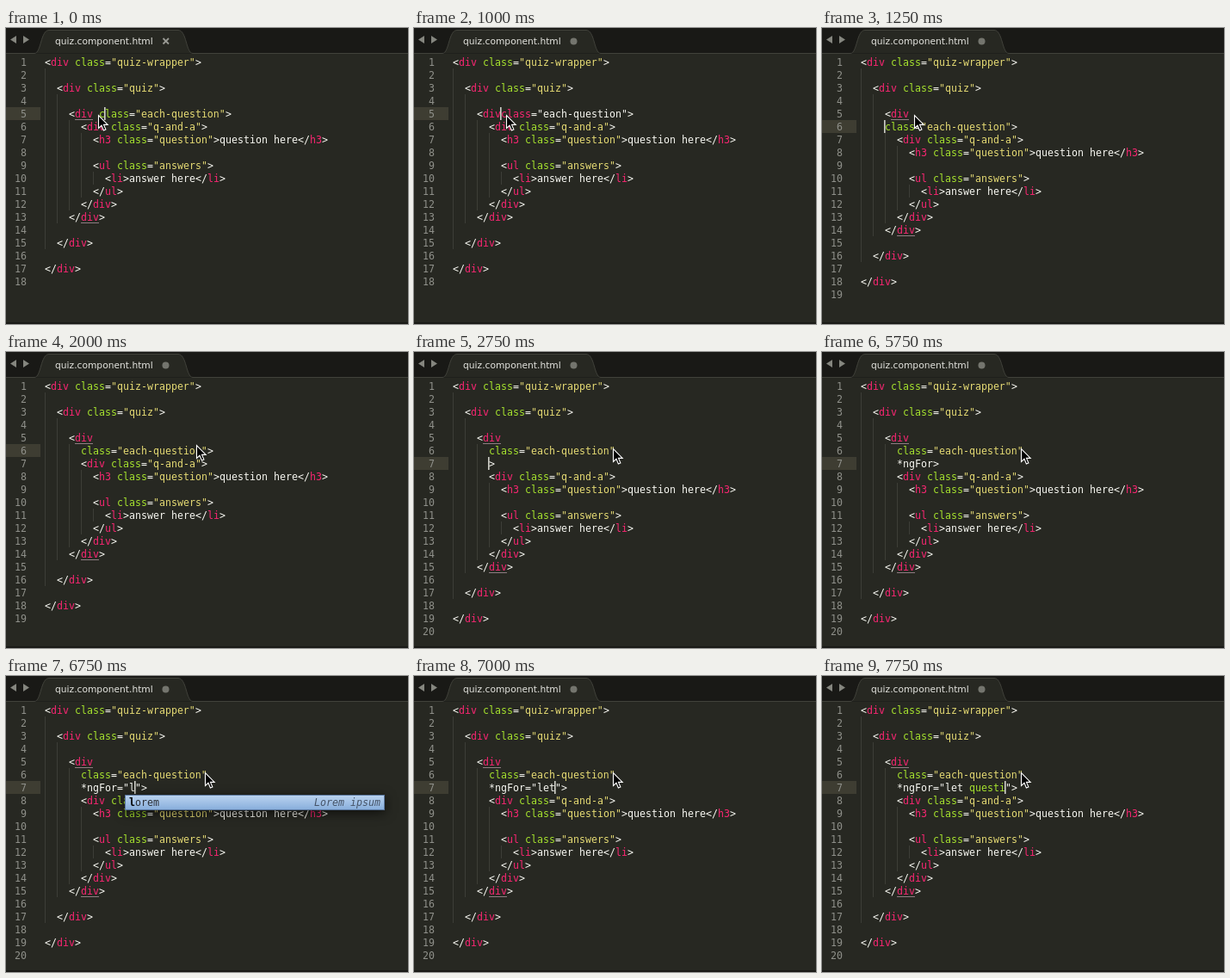
Recreate the animation shown at these times as an HTML page with a canvas. Size 467 by 344 pixels, loop 8 s.

```html
<!DOCTYPE html>
<html lang="en">
<head>
<meta charset="utf-8">
<title>Code editor</title>
<style>
  html, body { margin: 0; width: 100%; height: 100%; overflow: hidden; background: #272822; }
  canvas { display: block; }
</style>
</head>
<body>
<canvas width="467" height="344"></canvas>
<script>
const ctx = document.querySelector('canvas').getContext('2d');
const LOOP = 8000, LEFT = 45, CHAR = 7, LINE = 15;
const MONO = '11.627px "DejaVu Sans Mono", monospace';
const COLORS = { plain: '#f8f8f2', tag: '#f92672', attr: '#a6e22e', string: '#e6db74' };
const TOKEN = /(?<tag>(?<=<\/?)\w+)|(?<attr>(?<=\s)class|(?<=let )\w+)|(?<string>(?<=\sclass=)".*?")|(?<plain>.)/g;

const BEFORE = ['<div class="quiz-wrapper">', '', '  <div class="quiz">', ''];
const AFTER = [
  '      <div class="q-and-a">',
  '        <h3 class="question">question here</h3>',
  '',
  '        <ul class="answers">',
  '          <li>answer here</li>',
  '        </ul>',
  '      </div>',
  '    </div>',
  '',
  '  </div>',
  '',
  '</div>',
  ''
];

const ONE_LINE = '    <div class="each-question">';
const JOINED = '    <divclass="each-question">';
const SPLIT = '    <div\n      class="each-question">';
const typed = text => `    <div\n      class="each-question"\n      ${text}>`;

// [start ms, opening tag, caret line, caret column (null while hidden)]
const STEPS = [
  [0, ONE_LINE, 5, 10],
  [250, ONE_LINE, 5, null],
  [500, ONE_LINE, 5, 10],
  [750, ONE_LINE, 5, 9],
  [1000, JOINED, 5, 8],
  [1250, '    <div\n    class="each-question">', 6, 4],
  [1500, SPLIT, 6, 6],
  [2000, SPLIT, 6, null],
  [2250, SPLIT, 6, 6],
  [2500, SPLIT, 6, 27],
  [2750, typed(''), 7, 6],
  [3250, typed(''), 7, null],
  [3750, typed('*'), 7, 7],
  [4000, typed('*'), 7, null],
  [4250, typed('*'), 7, 7],
  [4500, typed('*n'), 7, 8],
  [4750, typed('*ng'), 7, 9],
  [5000, typed('*ngF'), 7, 10],
  [5250, typed('*ngFor'), 7, 12],
  [5750, typed('*ngFor'), 7, null],
  [6000, typed('*ngFor'), 7, 12],
  [6250, typed('*ngFor='), 7, 13],
  [6500, typed('*ngFor=""'), 7, 14],
  [6750, typed('*ngFor="l"'), 7, 15],
  [7000, typed('*ngFor="let"'), 7, 17],
  [7250, typed('*ngFor="let q"'), 7, 19],
  [7500, typed('*ngFor="let ques"'), 7, 22],
  [7750, typed('*ngFor="let questi"'), 7, 24]
];

// [start ms, x, y]
const POINTER = [[0, 107, 101], [1750, 162, 105], [2000, 221, 108], [2250, 231, 112]];

const TAB = new Path2D('M-2 29.5H33C41 29.5 40 2.5 50 2.5H200C210 2.5 209 29.5 217 29.5H469');
const ARROWS = new Path2D('M12 9V18L5 13.5ZM20 9V18L27 13.5Z');
const CROSS = new Path2D('M182.5 12L189 18.5M189 12L182.5 18.5');
const ARROW_POINTER = new Path2D('M.5 .5V15.5L4 12.3L6.4 18L8.9 17L6.5 11.4H11.2Z');

const rowTop = line => 32 + (line - 1) * LINE;
const colX = col => LEFT + col * CHAR;
const current = (list, time) => list.findLast(item => item[0] <= time);
const indentOf = line => line.search(/\S/);

function rect(color, x, y, w, h) {
  ctx.fillStyle = color;
  ctx.fillRect(x, y, w, h);
}

function text(string, x, y, color, font = MONO, align = 'left') {
  ctx.font = font;
  ctx.fillStyle = color;
  ctx.textAlign = align;
  ctx.fillText(string, x, y);
}

function stroke(path, color, width) {
  ctx.strokeStyle = color;
  ctx.lineWidth = width;
  ctx.stroke(path);
}

function drawTabBar(dirty) {
  rect('#191916', 0, 0, 467, 30);
  ctx.fillStyle = '#272822';
  ctx.fill(TAB);
  stroke(TAB, '#41423b', 1);
  ctx.fillStyle = '#85867f';
  ctx.fill(ARROWS);
  text('quiz.component.html', 57, 19, '#e4e4df', '10.7px "DejaVu Sans", sans-serif');
  if (dirty) {
    ctx.fillStyle = '#74756e';
    ctx.beginPath();
    ctx.arc(185.5, 15.5, 4, 0, 7);
    ctx.fill();
  } else {
    stroke(CROSS, '#999a94', 1.8);
  }
}

function drawLine(line, index, lines) {
  const top = rowTop(index + 1);
  const model = lines.slice(index).find(l => l) || '';
  for (let col = 0; col < indentOf(model); col += 2) rect('#3d3e37', colX(col), top, 1, LINE);
  text(index + 1, 24, top + 12, '#8f908a', MONO, 'right');
  for (const match of line.matchAll(TOKEN)) {
    const kind = Object.keys(COLORS).find(name => match.groups[name]);
    text(match[0], colX(match.index), top + 12, COLORS[kind]);
  }
}

function underlineTag(line, col) {
  rect('#8d7d82', colX(col), rowTop(line) + 14, 3 * CHAR, 1);
}

function drawCompletion() {
  const x = 138, y = 138, w = 302, h = 18;
  ctx.save();
  ctx.shadowColor = 'rgba(0,0,0,.65)';
  ctx.shadowBlur = 13;
  ctx.shadowOffsetY = 3;
  rect('#59759c', x, y, w, h);
  ctx.restore();
  const blue = ctx.createLinearGradient(0, y, 0, y + h);
  blue.addColorStop(0, '#bcd4f0');
  blue.addColorStop(1, '#86addb');
  rect(blue, x + 1, y + 1, w - 2, h - 2);
  text('l', colX(14), 151, '#000', 'bold ' + MONO);
  text('orem', colX(15), 151, '#2b2f36');
  text('Lorem ipsum', 435, 151, '#465468', 'italic ' + MONO, 'right');
}

function drawPointer([, x, y]) {
  ctx.save();
  ctx.translate(x, y);
  ctx.fillStyle = '#000';
  ctx.fill(ARROW_POINTER);
  stroke(ARROW_POINTER, '#fff', 1.1);
  ctx.restore();
}

function draw(time) {
  const [, opening, caretLine, caretCol] = current(STEPS, time);
  const lines = [...BEFORE, ...opening.split('\n'), ...AFTER];
  rect('#272822', 0, 0, 467, 344);
  drawTabBar(time >= 1000);
  rect('#3e3d32', 0, rowTop(caretLine), 40, LINE);
  lines.forEach(drawLine);
  if (opening !== JOINED) {
    underlineTag(5, 5);
    underlineTag(lines.length - 5, 6);
  }
  if (caretCol !== null) rect('#f8f8f0', colX(caretCol) - 0.8, rowTop(caretLine), 1.3, LINE);
  if (time >= 6750 && time < 7000) drawCompletion();
  drawPointer(current(POINTER, time));
  rect('#1a1a17', 0, 342, 467, 2);
}

const start = performance.now();
function tick() {
  draw((performance.now() - start) % LOOP);
  requestAnimationFrame(tick);
}
tick();
</script>
</body>
</html>
```
